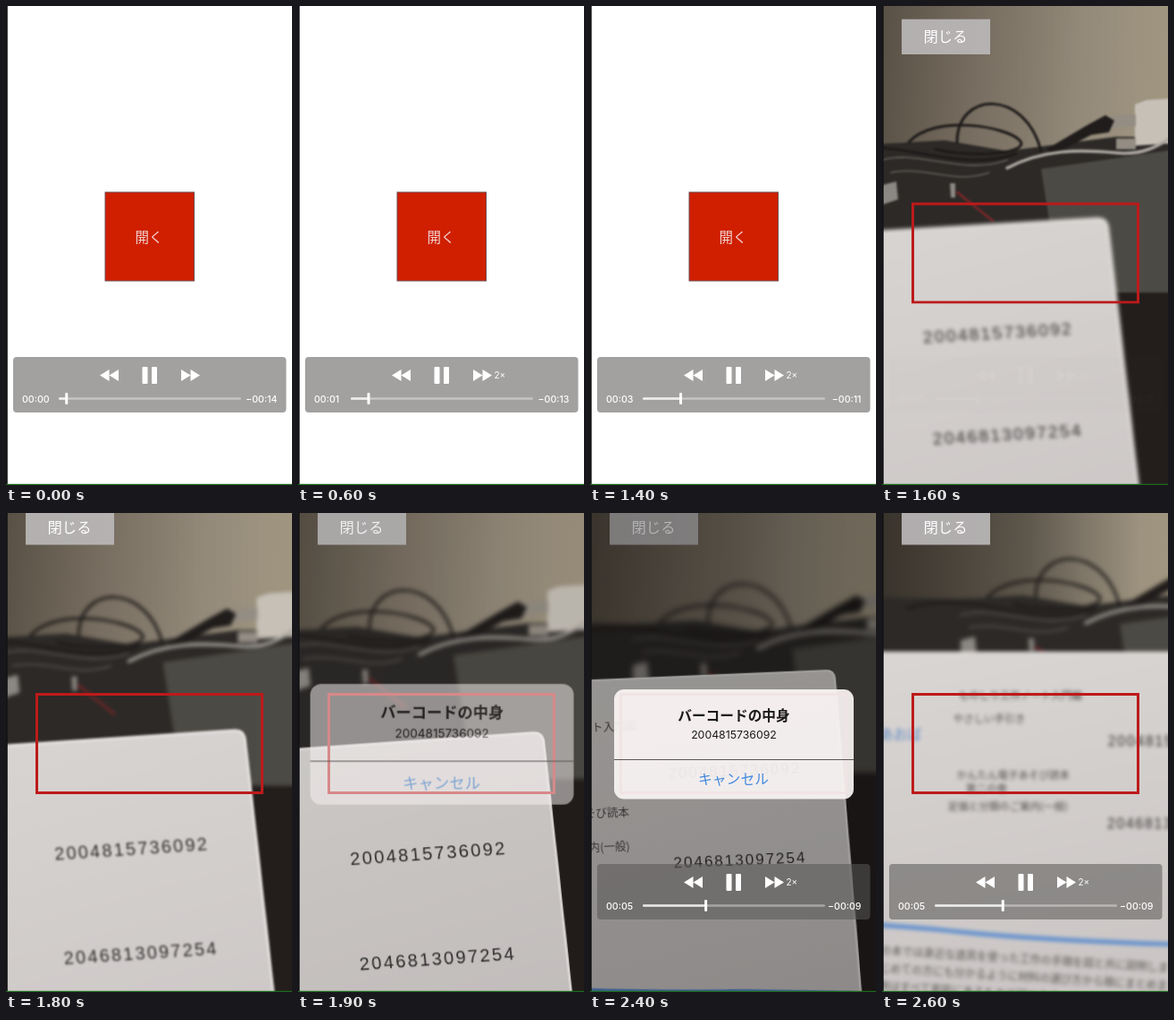
An HTML page for the animation above (2.7 s loop, 320 px wide and 535 px high).

```html
<!DOCTYPE html>
<html lang="ja">
<head>
<meta charset="utf-8">
<title>Scanner demo</title>
<style>
html, body { margin: 0; height: 100%; overflow: hidden; background: #fff; }
svg { display: block; width: 100vw; height: 100vh; }
text { font-family: "Noto Sans CJK JP", "Noto Sans CJK", sans-serif; }
.num { font-family: Inter, "Liberation Sans", sans-serif; }
.mid { text-anchor: middle; }
.end { text-anchor: end; }
.code { font: 17px "Liberation Sans", sans-serif; letter-spacing: 2px; fill: #2f2d2c; }
.line { font-size: 12.5px; text-anchor: end; fill: #4d4b48; }
.rows { font-size: 13px; fill: #55534f; }
.cable { fill: none; stroke-linecap: round; }

/* Script moves --t in 100 ms ticks; the keyframes follow it. */
.anim { animation: 2.7s linear calc(var(--t) * -1ms) infinite paused both; }
#camera { animation-name: slide; }
#room { animation-name: room; }
#shade { animation-name: shade; }
#page { animation-name: page; }
#print { animation-name: print; }
#ui { animation-name: settle; }
#dim { animation-name: dim; }
#alert { animation-name: alert; transform-origin: 161px 258px; }
#card { animation-name: card; }
#player { animation-name: player; }

@keyframes slide {
  0%, 51.852% { transform: translateY(535px); }
  55.556% { transform: translateY(260px); }
  59.259%, 100% { transform: none; }
}
@keyframes settle {
  0%, 59.259% { transform: translateY(18.5px); }
  62.963% { transform: translateY(5px); }
  66.667%, 100% { transform: none; }
}
@keyframes room {
  0%, 59.259% { transform: none; filter: blur(.8px); }
  70.37% { transform: translate(-4px, -23px); filter: blur(2.6px); }
  88.889% { transform: translate(48px, -30px); filter: blur(3px); }
  96.296%, 100% { transform: translate(88px, -58px); filter: blur(2.6px); }
}
@keyframes shade {
  0%, 70.37% { opacity: .15; }
  88.889% { opacity: .35; }
  96.296%, 100% { opacity: 1; }
}
@keyframes page {
  0%, 59.259% { transform: translate(248px, 236px) rotate(-3.4deg) scale(1.13) skewX(2.6deg); filter: blur(2px); }
  70.37% { transform: translate(270px, 244px) rotate(-4deg) scale(1.18) skewX(1.6deg); filter: blur(.3px); }
  88.889% { transform: translate(270px, 175px) rotate(-2.4deg) scale(1) skewX(1.7deg); filter: blur(.7px); }
  96.296%, 100% { transform: translate(428px, 155px) rotate(0deg) scale(.92) skewX(0deg); filter: blur(2.2px); }
}
@keyframes print {
  0%, 70.37% { opacity: 0; }
  81.481%, 100% { opacity: 1; }
}
@keyframes dim {
  0%, 66.667% { opacity: 0; }
  70.37% { opacity: .06; }
  74.074%, 88.889% { opacity: .3; }
  92.593% { opacity: .12; }
  96.296%, 100% { opacity: 0; }
}
@keyframes alert {
  0%, 66.667% { transform: scale(1.2); opacity: 0; }
  70.37% { transform: scale(1.1); opacity: 1; }
  74.074% { transform: scale(1.02); }
  77.778%, 88.889% { transform: none; opacity: 1; }
  92.593% { transform: none; opacity: .35; }
  96.296%, 100% { transform: none; opacity: 0; }
}
@keyframes card {
  0%, 70.37% { opacity: .56; }
  77.778%, 100% { opacity: 1; }
}
@keyframes player {
  0%, 51.852% { opacity: 1; }
  55.556% { opacity: .5; }
  59.259% { opacity: .03; }
  62.963%, 81.481% { opacity: 0; }
  85.185% { opacity: .6; }
  88.889%, 100% { opacity: 1; }
}
</style>
</head>
<body>
<svg id="stage" viewBox="0 0 320 535">
  <defs>
    <linearGradient id="wall" x2="1" y2=".12">
      <stop stop-color="#5f564a"/><stop offset=".35" stop-color="#7f7567"/>
      <stop offset=".7" stop-color="#988e7e"/><stop offset="1" stop-color="#a0957f"/>
    </linearGradient>
    <linearGradient id="dusk" x2="1">
      <stop stop-color="#2f2b25" stop-opacity=".8"/><stop offset=".5" stop-color="#3a352d" stop-opacity=".55"/>
      <stop offset=".9" stop-color="#3a352d" stop-opacity="0"/>
    </linearGradient>
    <linearGradient id="paper" x2=".3" y2="1">
      <stop stop-color="#dad7d4"/><stop offset="1" stop-color="#cbc6c5"/>
    </linearGradient>
  </defs>

  <rect width="320" height="535" fill="#fff"/>
  <rect x="111" y="208" width="99.5" height="99" fill="#d01f00" stroke="#6f4a50"/>
  <text class="mid" x="160" y="263.5" font-size="15.5" fill="#f0d5d2">開く</text>

  <g id="camera" class="anim">
    <rect width="320" height="535" fill="url(#wall)"/>
    <rect id="shade" class="anim" width="320" height="240" fill="url(#dusk)"/>

    <g id="room" class="anim">
      <path d="M-240 150 L0 154 L70 150 L140 162 L200 154 L262 146 L560 152 V680 H-240Z" fill="#2c2927"/>
      <path d="M178 182 L330 160 L560 152 V322 H200Z" fill="#4c4a44"/>
      <path d="M283 110 L296 105 L345 102 V152 L283 156Z" fill="#c6c0b7"/>
      <path d="M250 124 L284 121 V134 L252 137Z M262 148 H284 V160 H262Z" fill="#938d84"/>
      <path d="M184 160 L228 134 L250 122 L260 128 L254 141 L234 144 L192 166Z" fill="#1f1c1b"/>
      <g class="cable" stroke="#1d1a19" stroke-width="3">
        <path d="M84 152 C84 95 160 92 178 162"/>
        <path d="M30 152 C60 120 140 135 154 150 S100 170 60 160"/>
        <path d="M-60 165 C10 140 80 190 150 165"/>
      </g>
      <g class="cable" stroke="#625d57" stroke-width="1.6">
        <path d="M0 172 C40 160 90 190 140 172"/>
        <path d="M10 186 C50 178 80 200 120 186"/>
      </g>
      <path class="cable" d="M140 181 C180 160 220 160 262 164 S320 146 345 134" stroke="#aca7a0" stroke-width="3.5"/>
      <path class="cable" d="M84 208 L124 240" stroke="#7d2727" stroke-width="2.5"/>
      <path d="M0 200 L16 196 L18 216 L0 222Z M76 198 H82 V214 H77Z" fill="#8b8782"/>
      <path d="M-40 320 H560 V680 H-40Z" fill="#231e1c"/>
    </g>

    <g id="page" class="anim">
      <path d="M-640 0 H-6 Q3 0 4 9 L9 440 H-640Z" fill="url(#paper)"/>
      <path d="M-640 1 H-6 Q2 1 3 9 L8 440" fill="none" stroke="#e4e1df" stroke-width="2.5"/>
      <text class="code mid" x="-116" y="114">2004815736092</text>
      <text class="code mid" x="-117" y="214">2046813097254</text>
      <g id="print" class="anim">
        <text class="line" x="-222" y="58">ものしり工作ノート入門編</text>
        <text class="line" x="-291" y="86">やさしい手引き</text>
        <text class="line" x="-237" y="154">かんたん電子あそび読本</text>
        <text class="line" x="-313" y="171">第二の巻</text>
        <text class="line" x="-239" y="192">定価と分類のご案内(一般)</text>
        <text x="-468" y="106" font-size="17" fill="#5d86c4">あおば</text>
      </g>
      <path d="M-640 326 Q-480 328 -380 339 T-117 355 L0 362" fill="none" stroke="#5b8cce" stroke-width="5"/>
      <g class="rows" transform="translate(-480 366) rotate(3.5)">
        <text>この本では身近な道具を使った工作の手順を図と共に説明します</text>
        <text y="22">はじめての方にも分かるように材料の選び方から順にまとめました</text>
        <text y="44">作例はすべて家庭にあるもので試せます。ぜひお楽しみください</text>
      </g>
    </g>

    <g id="ui" class="anim">
      <rect x="34.5" y="202.5" width="252" height="110" fill="none" stroke="#bd1a1a" stroke-width="3"/>
      <rect x="22" y="-4" width="99" height="39.5" fill="#bbb8b9" fill-opacity=".92"/>
      <text class="mid" x="71" y="21.5" font-size="16.3" fill="#fff">閉じる</text>
    </g>
    <rect id="dim" class="anim" width="320" height="535"/>
  </g>

  <g id="alert" class="anim">
    <g id="card" class="anim">
      <rect x="27" y="197" width="268" height="122.5" rx="11" fill="#faf5f5" fill-opacity=".93"/>
      <text class="mid" x="161" y="231.5" font-size="15.7" font-weight="700" fill="#1c1a1a">バーコードの中身</text>
      <text class="num mid" x="161" y="251.5" font-size="12.3" fill="#1c1a1a">2004815736092</text>
      <text class="mid" x="160.5" y="303" font-size="15.8" font-weight="500" fill="#4389de">キャンセル</text>
    </g>
    <path d="M27 275.5 H295" stroke="#5a5656"/>
  </g>

  <g id="player" class="anim" fill="#fff">
    <rect x="8" y="392" width="305.5" height="62" rx="4" fill="#5a5856" fill-opacity=".56"/>
    <path d="M115.5 406 V419 L105 412.5Z M126 406 V419 L115.5 412.5Z"/>
    <path d="M196 406 V419 L206.5 412.5Z M206.5 406 V419 L217 412.5Z"/>
    <rect x="152.5" y="403" width="6" height="19" rx="1"/>
    <rect x="163" y="403" width="6" height="19" rx="1"/>
    <text id="speed" class="num" x="219.5" y="416" font-size="10">2×</text>
    <g font-size="10.6" font-weight="500">
      <text id="past" class="num" x="18" y="442.5"></text>
      <text id="left" class="num end" x="303.5" y="442.5"></text>
    </g>
    <rect x="59" y="437.3" width="204" height="2.4" rx="1.2" fill-opacity=".38"/>
    <rect id="played" x="59" y="437.3" height="2.4" rx="1.2" fill-opacity=".75"/>
    <rect id="thumb" y="432" width="3" height="13" rx="1"/>
  </g>

  <rect width="1.8" height="535" fill="#141416"/>
  <rect y="533.8" width="320" height="1.2" fill="#1b6b1b"/>
</svg>
<script>
const LOOP = 2700, TICK = 100, FAST_AT = 400;
const TRACK_X = 59, PX_PER_SEC = 14.07, CLIP_SEC = 14;
const $ = id => document.getElementById(id);
const clock = sec => "00:" + String(sec).padStart(2, "0");
const start = performance.now();

function draw() {
  const t = Math.floor((performance.now() - start) % LOOP / TICK) * TICK;
  const fast = Math.max(0, t - FAST_AT);
  const pos = 0.62 + (t + fast) / 1000;
  const sec = Math.floor(pos);
  const x = pos * PX_PER_SEC;

  $("stage").style.setProperty("--t", t);
  $("past").textContent = clock(sec);
  $("left").textContent = "−" + clock(CLIP_SEC - sec);
  $("played").setAttribute("width", x);
  $("thumb").setAttribute("x", TRACK_X + x - 1.5);
  $("speed").style.visibility = t >= FAST_AT ? "visible" : "hidden";
  requestAnimationFrame(draw);
}
draw();
</script>
</body>
</html>
```
